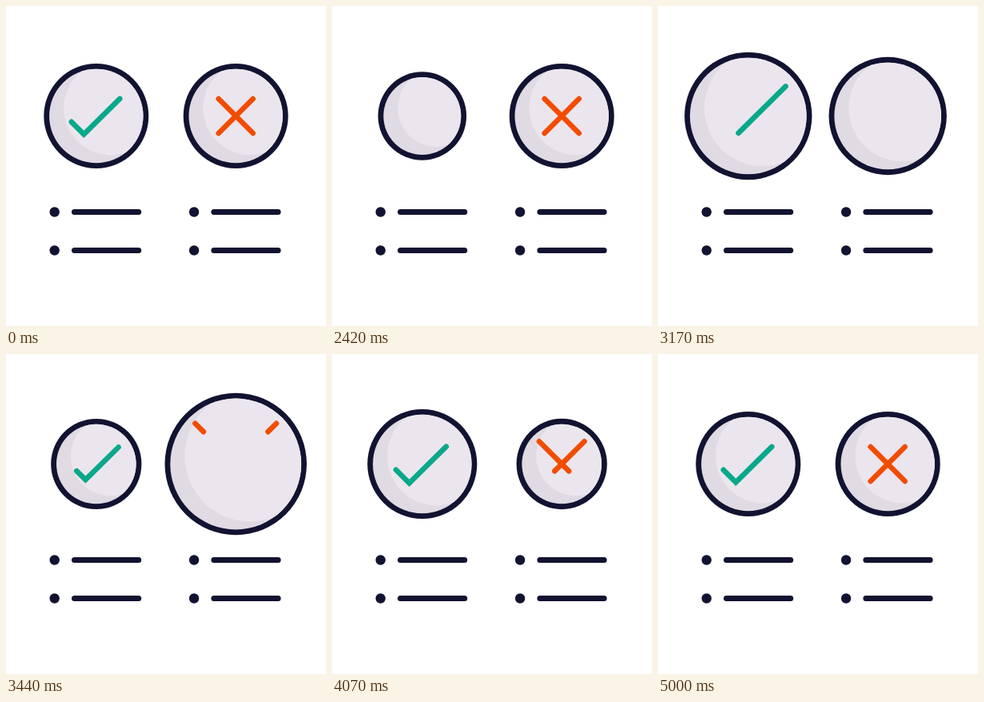
An HTML page with a canvas that plays this animation: 400 px wide and 400 px high, repeating every 5030 ms.

```html
<!DOCTYPE html>
<html lang="en">
<head>
<meta charset="utf-8">
<title>Check and cross</title>
<style>
  html, body { margin: 0; width: 100%; height: 100%; overflow: hidden; background: #fff; }
  canvas { display: block; width: 100vmin; height: 100vmin; }
</style>
</head>
<body>
<canvas id="stage" width="400" height="400"></canvas>
<script>
const ctx = document.getElementById('stage').getContext('2d');
const LOOP = 5030, START = 2030, STEP = 30;
const NAVY = '#121331', LIGHT = '#ebe6ed', SHADE = '#e0dae3';
const GREEN = '#08a88a', ORANGE = '#f24c00';
const REST = 65.5, RING = 6.8, CY = 137.5;

const linear = u => u;
const smooth = u => (1 - Math.cos(Math.PI * u)) / 2;
const out = u => 1 - (1 - u) ** 2.5;

// keys: [time, value, easing that leads to this key]
function track(keys, t) {
  if (t <= keys[0][0]) return keys[0][1];
  for (let i = 1; i < keys.length; i++) {
    const [t0, v0] = keys[i - 1], [t1, v1, ease] = keys[i];
    if (t < t1) return v0 + (v1 - v0) * ease((t - t0) / (t1 - t0));
  }
  return keys[keys.length - 1][1];
}

// A mark is a stroke of fixed length that slides along a longer path.
// Lengths are measured horizontally; `at` maps a length to a point.
const checkAt = s => [s - 31, s < 15.5 ? 7.3 + s : 22.8 - (s - 15.5) * 0.987];
const crossAt = side => s => [side * (21.5 - s), 21.5 - s];

const badges = [
  {
    x: 112.8, color: GREEN, length: 60.5, pathEnd: 69.5, paths: [checkAt], bend: 15.5,
    radius: [[2000, REST], [2400, 51.5, smooth], [2950, 94, out],
             [3470, 56.3, smooth], [3800, 70, smooth], [4500, REST, smooth]],
    exit: [[2000, 0], [2340, -61, linear]],
    enter: [[2465, 70], [3580, 0, smooth], [3900, -0.8, smooth], [4200, -0.8, linear], [5000, 0, smooth]]
  },
  {
    x: 287.2, color: ORANGE, length: 43, pathEnd: 59, paths: [crossAt(1), crossAt(-1)],
    radius: [[2520, REST], [2990, 51.5, smooth], [3620, 90.4, out],
             [4100, 56.3, smooth], [4530, 70, smooth], [5000, REST, smooth]],
    exit: [[2630, 0], [2970, -43.5, linear]],
    enter: [[3130, 59], [4448, 0, smooth], [4650, -0.6, smooth], [5000, 0, smooth]]
  }
];

function disc(x, y, r, color) {
  ctx.beginPath();
  ctx.arc(x, y, r, 0, Math.PI * 2);
  ctx.fillStyle = color;
  ctx.fill();
}

function line(points, color, width) {
  ctx.beginPath();
  points.forEach(p => ctx.lineTo(...p));
  ctx.strokeStyle = color;
  ctx.lineWidth = width;
  ctx.stroke();
}

function drawMark(badge, t) {
  const entering = t >= badge.enter[0][0];
  const slide = track(entering ? badge.enter : badge.exit, t);
  const from = Math.max(slide, -0.4);
  const to = Math.min(badge.length + slide, badge.pathEnd);
  if (to - from < 0.3) return;
  const stops = [from, to];
  if (badge.bend > from && badge.bend < to) stops.splice(1, 0, badge.bend);
  const scale = track(badge.radius, t) / REST;
  for (const at of badge.paths) {
    line(stops.map(s => at(s).map(v => v * scale)), badge.color, 6.6);
  }
}

function drawBadge(badge, t) {
  const r = track(badge.radius, t), inner = r - RING;
  ctx.save();
  ctx.translate(badge.x, CY);
  disc(0, 0, r, NAVY);
  disc(0, 0, inner, SHADE);
  ctx.save();
  ctx.clip();
  disc(18, -10, inner, LIGHT);
  ctx.restore();
  drawMark(badge, t);
  ctx.restore();
}

function drawList(x) {
  for (const y of [257.5, 305.5]) {
    disc(x, y, 6.2, NAVY);
    line([[x + 24.8, y], [x + 105, y]], NAVY, 7);
  }
}

function draw(t) {
  ctx.fillStyle = '#fff';
  ctx.fillRect(0, 0, 400, 400);
  ctx.lineCap = ctx.lineJoin = 'round';
  ctx.miterLimit = 10;
  drawList(60.7);
  drawList(235.1);
  for (const badge of badges) {
    ctx.lineJoin = 'miter';
    drawBadge(badge, t);
  }
}

function frame() {
  const t = performance.now() % LOOP;
  draw(t < START ? 0 : t - (t - START) % STEP);
  requestAnimationFrame(frame);
}
frame();
</script>
</body>
</html>
```
